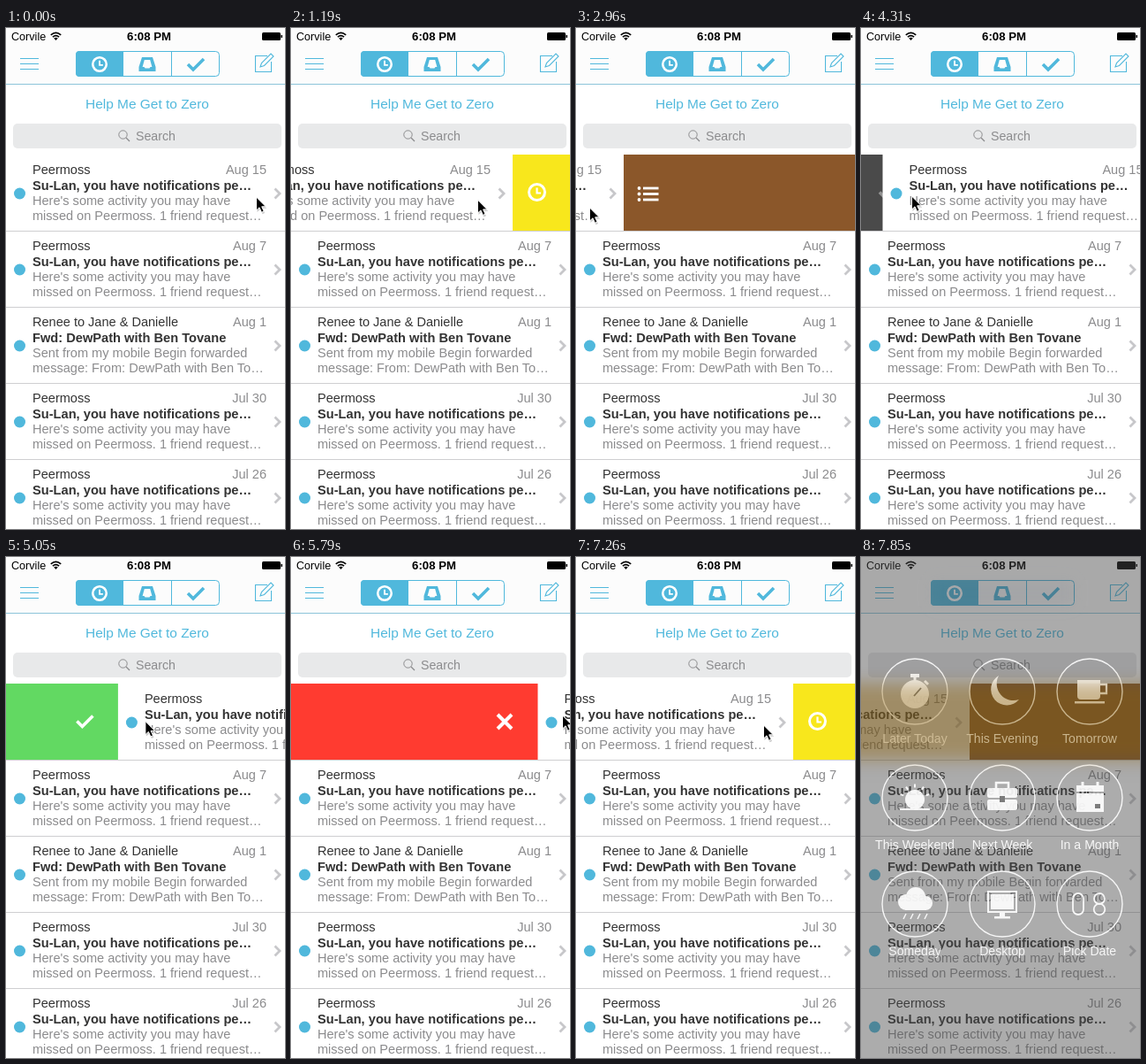
An HTML page that plays this animation: 316x566 px, repeating every 8 s.

```html
<!DOCTYPE html>
<html lang="en">
<head>
<meta charset="utf-8">
<title>Swipeable inbox</title>
<style>
html, body { margin: 0; width: 100%; height: 100%; overflow: hidden; background: #fff; }
svg { display: block; width: 316px; height: 566px; font: 14.55px "Liberation Sans", Arial, sans-serif; }
.line { fill: none; stroke: currentColor; }
.bold { font-weight: bold; }
.end { text-anchor: end; }
.mid { text-anchor: middle; }
.grey { fill: #8b8b8d; }
</style>
</head>
<body>
<svg id="stage" viewBox="0 0 316 566"></svg>
<script>
const LOOP = 8000, ACCENT = '#50b8dc', ROW_WIDTH = 320, ROW_TOP = 143, ROW_HEIGHT = 86;

const text = (x, y, str, cls = '', attrs = '') => `<text x="${x}" y="${y}" class="${cls}" ${attrs}>${str}</text>`;
const line = (d, width = 1, attrs = '') => `<path class="line" d="${d}" stroke-width="${width}" ${attrs}/>`;
const circle = (x, y, r, attrs = '') => `<circle cx="${x}" cy="${y}" r="${r}" ${attrs}/>`;
const rect = (x, y, w, h, attrs = '') => `<rect x="${x}" y="${y}" width="${w}" height="${h}" ${attrs}/>`;
const at = (x, y, body, attrs = '') => `<g transform="translate(${x} ${y})" ${attrs}>${body}</g>`;

// Icons are centred on their own origin and use the current colour.
const clock = circle(0, 0, 9, 'class="line" stroke-width="3"') + line('M0 -5V1H4.5', 2.2);
const check = line('M-9 0L-3 6L9 -6', 3.6);
const cross = line('M-8 -8L8 8M8 -8L-8 8', 4);
const list = [-6.5, 0, 6.5].map(y => circle(-10, y, 1.9, 'fill="currentColor"') + line(`M-5.5 ${y}H12`, 2.8)).join('');

const activity = date => ({
  from: 'Peermoss', date, subject: 'Su-Lan, you have notifications pe…',
  body: ["Here's some activity you may have", 'missed on Peermoss. 1 friend request…']
});
const messages = [
  activity('Aug 15'),
  activity('Aug 7'),
  { from: 'Renee to Jane &amp; Danielle', date: 'Aug 1', subject: 'Fwd: DewPath with Ben Tovane',
    body: ['Sent from my mobile Begin forwarded', 'message: From: DewPath with Ben To…'] },
  activity('Jul 30'),
  activity('Jul 26')
];

const messageRow = m =>
  rect(0, 0, ROW_WIDTH, ROW_HEIGHT, 'fill="#fff"') +
  circle(15.5, 44, 6.5, `fill="${ACCENT}"`) +
  text(30, 22, m.from, '', 'fill="#333"') +
  text(295, 22, m.date, 'end grey') +
  text(30, 40, m.subject, 'bold', 'fill="#333" font-size="14.65"') +
  text(30, 57, m.body[0], 'grey') + text(30, 74, m.body[1], 'grey') +
  line('M304.5 38.5L310 44L304.5 49.5', 2.8, 'color="#c7c7ca"');

const statusBar =
  text(6, 13.5, 'Corvile', '', 'font-size="12.6"') +
  line('M50.8 7.8Q56.5 2.8 62.2 7.8M52.9 10.1Q56.5 7 60.1 10.1', 1.7) +
  '<path d="M54.2 11.5Q56.5 9.8 58.8 11.5L56.5 14Z"/>' +
  text(162, 14, '6:08 PM', 'bold mid', 'font-size="13.2"') +
  rect(290, 5, 21, 9, 'rx="1.5"') + rect(311.5, 8, 1.5, 3);

const navBar =
  line('M16 34.5H37M16 40.5H37M16 46.5H37') +
  '<path d="M83 26H133V55H83Q79 55 79 51V30Q79 26 83 26Z" fill="currentColor"/>' +
  rect(79.5, 26.5, 162, 28, 'rx="4" class="line"') + line('M132.5 26V55M187.5 26V55') +
  at(106, 41, `<g transform="scale(.86)">${clock}</g>`, 'color="#fff"') +
  at(160, 41, '<path fill="currentColor" fill-rule="evenodd" d="M-6 -8H6L9.5 3V8H-9.5V3ZM-3.2 -5L-5.4 3H-3.5L-2.5 4.5H2.5L3.5 3H5.4L3.2 -5Z"/>') +
  at(215, 41, check) +
  line('M296 31.5H282.5V49.5H300.5V38M288 44L289.5 39.5L300 29L303 32L292.5 42.5Z', 1.1) +
  line('M0 63.5H316', 1, 'color="#8dc5d9"') +
  text(160, 91, 'Help Me Get to Zero', 'mid', 'fill="currentColor" font-size="15.45"');

const searchBar =
  rect(8, 108, 304, 28, 'rx="5" fill="#e8e9ea"') +
  circle(132.5, 120.5, 4.7, 'class="line" color="#8b8b8d"') + line('M136 124L140 128', 1.3, 'color="#8b8b8d"') +
  text(147, 126.5, 'Search', 'grey', 'font-size="14.2"');

const F = 'fill="currentColor"';
const choices = [
  ['Later Today', circle(0, 3, 16, F) + rect(-5, -20, 10, 4, F) + rect(-1.5, -17, 3, 6, F) +
    line('M11 -12L15 -8', 3) + line('M-1 5L7 -4', 1.8, 'color="#777"')],
  ['This Evening', `<path ${F} d="M-4 -18A18 18 0 1 0 19 9A19 19 0 0 1 -4 -18Z"/>`],
  ['Tomorrow', `<path ${F} d="M-14 -13H12V5Q12 9 8 9H-10Q-14 9 -14 5Z"/>` + line('M12 -8H19V2H12', 2.3) + rect(-17, 11, 34, 2.5, F)],
  ['This Weekend', circle(0, 2, 11, F) + line('M-17 13H17', 2) +
    [-160, -125, -90, -55, -20].map(a => line('M13.5 0H17.5', 2, `transform="translate(0 2) rotate(${a})"`)).join('')],
  ['Next Week', rect(-17, -11, 34, 11, `rx="2" ${F}`) + rect(-17, 2, 34, 12, `rx="2" ${F}`) +
    line('M-7 -11V-17H7V-11', 2.6) + rect(-3, -2, 6, 7, 'fill="#777"')],
  ['In a Month', rect(-15, -14, 31, 7, F) + rect(-15, -5, 31, 21, F) + line('M-8 -18V-12M9 -18V-12', 3) + rect(6, 7, 6, 5, 'fill="#777"')],
  ['Someday', circle(-10, -2, 9, F) + circle(1, -8, 11, F) + circle(12, -1, 8, F) + rect(-11, -3, 24, 10, F) +
    line('M-10 11L-13 17M-2 11L-5 17M6 11L3 17M14 11L11 17', 1.5)],
  ['Desktop', rect(-16, -14, 32, 23, 'class="line" stroke-width="2"') + rect(-13, -11, 26, 17, F) + rect(-3, 10, 6, 5, F) + rect(-9, 14, 18, 2.5, F)],
  ['Pick Date', line('M-13 -12A6 6 0 0 1 -7 -6V6A6 6 0 0 1 -19 6V-6A6 6 0 0 1 -13 -12Z', 1.8) +
    circle(11, -6, 6, 'class="line" stroke-width="1.8"') + circle(11, 6, 6.3, 'class="line" stroke-width="1.8"')]
];

const choiceGrid = choices.map(([label, icon], i) =>
  at(61 + i % 3 * 99, 152 + Math.floor(i / 3) * 120,
    circle(0, 0, 37, 'class="line" stroke-width="1.4"') + icon +
    text(0, 58, label, 'mid', `${F} font-size="14.1"`))).join('');

const stage = document.getElementById('stage');
stage.innerHTML =
  '<defs><filter id="soft" x="-20%" y="-60%" width="140%" height="220%"><feGaussianBlur stdDeviation="9"/></filter></defs>' +
  rect(0, 0, 316, 566, 'fill="#fff"') + rect(0, 0, 316, 63, 'fill="#fcfcfc"') +
  statusBar + `<g color="${ACCENT}">${navBar}</g>` + searchBar +
  rect(0, ROW_TOP, 316, ROW_HEIGHT, 'id="under"') +
  Object.entries({ clock, list, check, cross }).map(([id, icon]) => `<g id="${id}" color="#fff">${icon}</g>`).join('') +
  messages.map((m, i) => `<g id="row${i}" transform="translate(0 ${ROW_TOP + i * ROW_HEIGHT})">${messageRow(m)}</g>`).join('') +
  line('M0 229.5H316M0 315.5H316M0 401.5H316M0 487.5H316', 1, 'color="#cfcfd1"') +
  '<g id="cursor"><path d="M1 2V17L4.5 13.8L7 19.3L9.6 18.1L7.2 12.8H11.8Z" opacity=".2"/>' +
  '<path d="M0 0V15L3.5 11.8L6 17.3L8.6 16.1L6.2 10.8H10.8Z" stroke="#fff"/></g>' +
  `<g id="shade">${rect(0, 0, 316, 566, 'fill="#4a4a4a"')}${rect(79, 26, 163, 29, 'fill="#3c4144" filter="url(#soft)"')}</g>` +
  `<g id="choices" color="#fff">${choiceGrid}</g>` +
  rect(-40, ROW_TOP, 396, ROW_HEIGHT, 'id="glow" fill="#906000" filter="url(#soft)"');

const $ = id => document.getElementById(id);

// Bursts of evenly spaced updates: first, last, count.
const bursts = [
  [750, 1770, 8], [1920, 2960, 8], [3260, 4160, 7], [4310, 5350, 8],
  [5490, 5790, 3], [6240, 7260, 8], [7410, 7850, 4]
];
const rowKeys = [
  [600, 0], [1920, -155], [2960, -266], [3110, -266], [3560, 0], [4160, 0], [4310, 24.5],
  [5790, 279.5], [6090, 279.5], [6540, 0], [6680, 0], [7260, -74], [7850, -197]
];
const cursorKeys = [
  [600, 283.5, 191], [1920, 121.5, 198], [2960, 15.5, 203], [3110, 15.5, 203], [4160, 33, 192], [4310, 57.5, 190],
  [5790, 307.5, 179], [6090, 307.5, 179], [6680, 286, 189], [7260, 212.5, 190], [7850, 90, 194]
];
const fadeKeys = [[7660, 0], [7850, 1]];

function steppedTime(t) {
  const burst = bursts.findLast(([first]) => t >= first);
  if (!burst) return 0;
  const [first, last, count] = burst, step = (last - first) / (count - 1);
  return first + step * Math.min(count - 1, Math.floor((t - first) / step + 1e-6));
}

function sample(keys, t, column = 1) {
  const next = keys.findIndex(key => key[0] > t);
  if (next === 0) return keys[0][column];
  if (next < 0) return keys[keys.length - 1][column];
  const a = keys[next - 1], b = keys[next];
  return a[column] + (b[column] - a[column]) * (t - a[0]) / (b[0] - a[0]);
}

const place = (id, x, y) => $(id).setAttribute('transform', `translate(${x} ${y})`);
const fade = (id, opacity) => $(id).setAttribute('opacity', opacity);

function render(t) {
  const x = sample(rowKeys, t), distance = Math.abs(x), overlay = sample(fadeKeys, t);
  const far = distance > 190, near = distance < 60;
  const shown = x < 0 ? (far ? 'list' : 'clock') : (far ? 'cross' : 'check');
  const colors = { list: '#8b572a', clock: '#f8e71c', cross: '#ff3b30', check: '#62d962' };
  const iconX = x < 0 ? Math.min(288, ROW_WIDTH + x + 27.5) : Math.max(30, x - 37.5);

  place('row0', x, ROW_TOP);
  $('under').setAttribute('fill', near ? '#4a4a4a' : colors[shown]);
  for (const id in colors) {
    place(id, iconX, id === 'cross' ? 186 : id === 'list' ? 187.5 : 185.5);
    fade(id, id === shown ? Math.min(1, distance / 60) * (1 - overlay) : 0);
  }

  place('cursor', sample(cursorKeys, t), sample(cursorKeys, t, 2));
  fade('cursor', overlay > 0 ? 0 : 1);
  fade('shade', overlay * .46);
  fade('choices', overlay * .9);
  fade('glow', overlay * .4);
}

const start = performance.now();
function tick() {
  render(steppedTime((performance.now() - start) % LOOP));
  requestAnimationFrame(tick);
}
tick();
</script>
</body>
</html>
```
